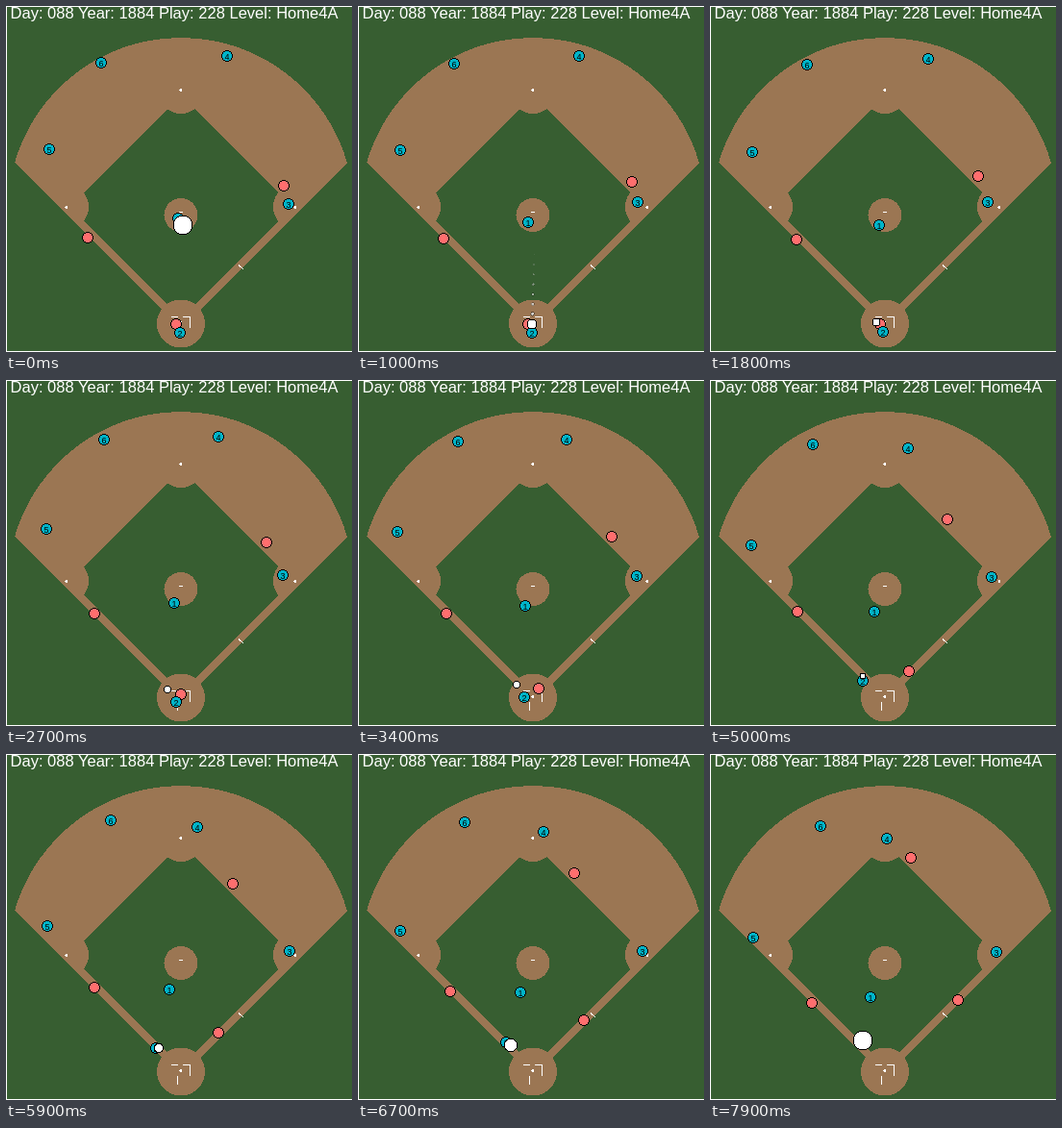
An HTML page for the animation above (8 s loop, 360 by 360 pixels).

```html
<!DOCTYPE html>
<html>
<head>
<meta charset="utf-8">
<style>
html, body { margin: 0; width: 100%; height: 100%; overflow: hidden; }
svg { display: block; font-family: "Liberation Sans", Arial, sans-serif; }
.grass { fill: #375e31; }
.dirt { fill: #9b7653; }
.chalk { fill: none; stroke: #fff; }
.disc { stroke: #000; }
</style>
</head>
<body>
<svg id="stage" width="360" height="360" shape-rendering="crispEdges">
  <rect class="grass" width="360" height="360"/>
  <g class="dirt">
    <circle cx="182" cy="213" r="180"/>
    <path class="grass" d="M182 93L298 209L182 325L66 209Z"/>
    <circle cx="182" cy="88" r="24"/>
    <circle cx="62" cy="209" r="24"/>
    <circle cx="302" cy="209" r="24"/>
    <path class="grass" d="M0 154L182 336L364 154V360H0Z"/>
    <circle cx="182" cy="217.5" r="17.5"/>
    <circle cx="182" cy="330.5" r="25"/>
  </g>
  <g fill="#fff">
    <circle cx="182" cy="87.5" r="1.5"/>
    <circle cx="63" cy="209.5" r="1.5"/>
    <circle cx="301" cy="209.5" r="1.5"/>
    <circle cx="182" cy="329.5" r="1.5"/>
    <text x="4.5" y="13" font-size="16.55">Day: 088 Year: 1884 Play: 228 Level: Home4A</text>
  </g>
  <path class="chalk" d="M180 214.5h4M242 269.5l5 4.5M172 323.5h7M184 323.5h7.5v11M178.5 335v9"/>
  <path class="chalk" d="M360 .5H.5V359.5H360"/>
</svg>
<script>
const stage = document.getElementById('stage');
const RED = '#ff6e6e', TEAL = '#00b4c8';
const LOOP = 8, STEP = .1, END = 7.9, HIT = 1.1;

function add(tag, attrs, parent = stage) {
  const el = document.createElementNS('http://www.w3.org/2000/svg', tag);
  set(el, attrs);
  return parent.appendChild(el);
}

function set(el, attrs) {
  for (const name in attrs) el.setAttribute(name, attrs[name]);
}

// A path is a start point and legs of { by: end time, to: point, pow: easing }.
const leg = (by, to, pow = 1) => ({ by, to, pow });
const wait = by => ({ by });

function follow([start, ...legs], t) {
  let from = start, since = 0;
  for (const { by, to = from, pow = 1 } of legs) {
    if (t < by) {
      const k = ((t - since) / (by - since)) ** pow;
      return from.map((v, i) => v + (to[i] - v) * k);
    }
    from = to;
    since = by;
  }
  return from;
}

function player(color, label, ...path) {
  const el = add('g', {});
  add('circle', { class: 'disc', r: 5.5, fill: color }, el);
  add('text', { y: 3.5, 'font-size': 9, 'text-anchor': 'middle' }, el).textContent = label;
  return { el, path };
}

const players = [
  player(RED, '', [289, 187], leg(END, [209, 108], 1.4)),
  player(RED, '', [85, 241], leg(2.7, [92, 243], .6), wait(3.4), leg(5, [91, 241]), leg(END, [106, 259], 2)),
  player(RED, '', [177, 331], wait(1.7), leg(END, [258, 256], 1.55)),
  player(TEAL, 1, [179, 221], leg(END, [167, 253])),
  player(TEAL, 2, [181, 340], wait(1), leg(5, [159, 313], 2), leg(6.7, [154, 300]), leg(END, [158, 298])),
  player(TEAL, 3, [294, 206], leg(2.7, [288, 203], .6), leg(END, [298, 206], .8)),
  player(TEAL, 4, [230, 52], wait(1), leg(END, [184, 88], 1.2)),
  player(TEAL, 5, [45, 149], leg(3.4, [41, 158], 1.6), leg(END, [45, 191], .8)),
  player(TEAL, 6, [99, 59], leg(END, [115, 75], 1.5))
];

// x, y, radius: pitched, bunted, then picked up
const ballPath = [[184, 228, 10], leg(HIT, [181, 341, 4.5]), leg(5, [159, 308, 3], .6), leg(END, [159, 298, 10], 1.2)];
const trail = Array.from({ length: 7 }, (_, i) => {
  const age = 7 - i, fade = 1 - age / 8;
  return { age, el: add('circle', { class: 'disc', fill: '#ddd', r: .5 + 1.5 * fade, 'stroke-width': fade / 2, opacity: fade }) };
});
const ball = add('circle', { class: 'disc', fill: '#fff' });

function draw(t) {
  for (const { el, path } of players) {
    set(el, { transform: `translate(${follow(path, t).map(Math.round)})` });
  }
  for (const { el, age } of trail) {
    const past = t - age * STEP;
    const [cx, cy] = follow(ballPath, past);
    set(el, { cx, cy, visibility: past > 0 && t <= HIT ? 'visible' : 'hidden' });
  }
  const [cx, cy, r] = follow(ballPath, t);
  set(ball, { cx: Math.round(cx), cy: Math.round(cy), r });
}

const start = performance.now();
function tick() {
  const t = (performance.now() - start) / 1000 % LOOP;
  draw(Math.floor(t / STEP) * STEP);
  requestAnimationFrame(tick);
}
tick();
</script>
</body>
</html>
```
